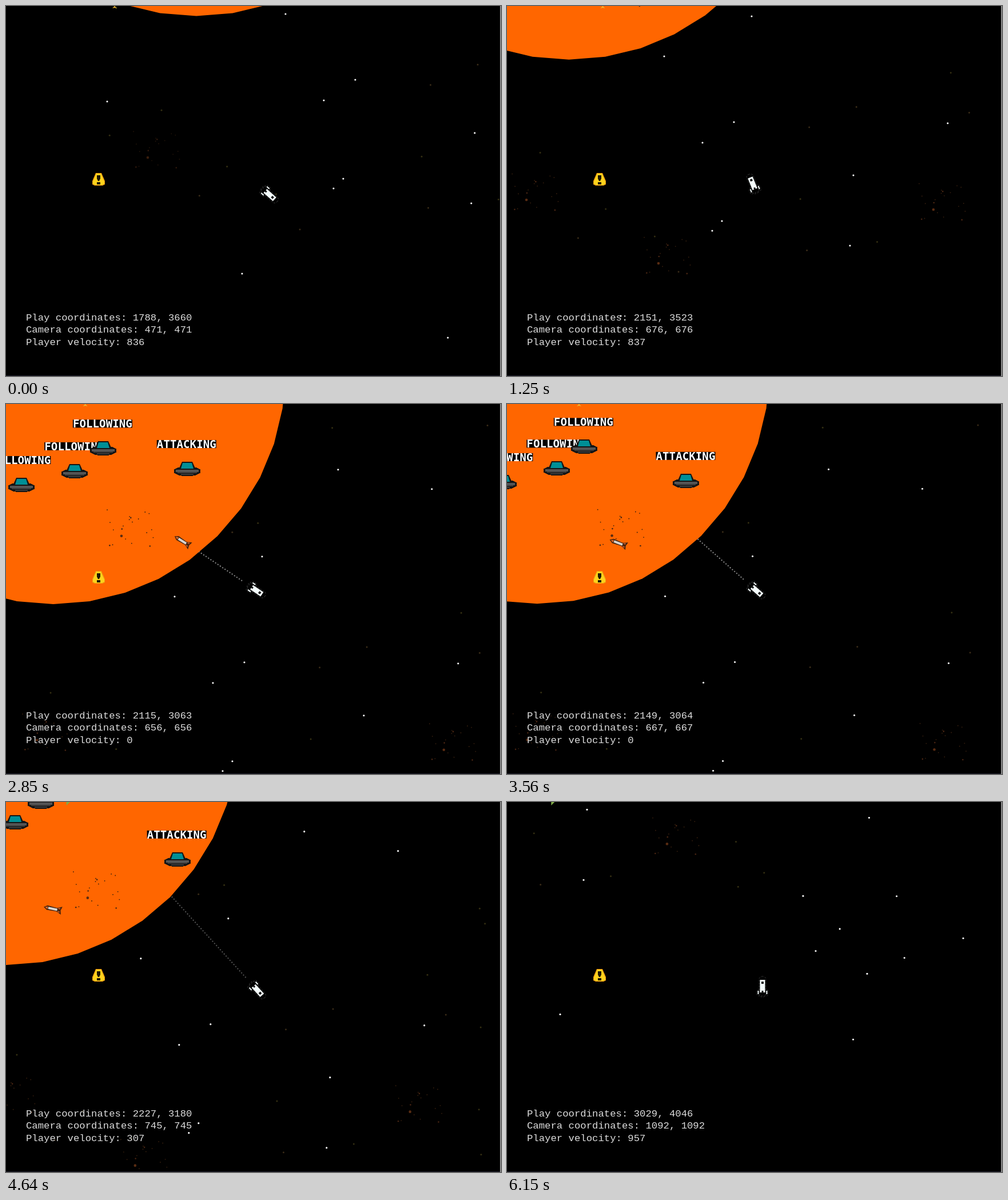
These frames come from a looping animation (866 px wide and 647 px high, 6.23 s). An HTML page with a canvas:

```html
<!DOCTYPE html>
<html lang="en">
<head>
<meta charset="utf-8">
<title>Space flight</title>
<style>
html, body { margin: 0; width: 100%; height: 100%; overflow: hidden; background: #000; }
canvas { display: block; width: 866px; height: 647px; }
</style>
</head>
<body>
<canvas id="stage" width="866" height="647"></canvas>
<script>
const ctx = document.getElementById('stage').getContext('2d');
const LOOP = 6230, TICK = 78;
const REST = { x: 436, y: 326 };   // where the ship sits when the camera has caught up
const SCALE = 1.85;                // world units per star pixel

// Waypoints of the flight
const WAY = {
  time: [0, 1250, 2060, 2850, 4260, 5280, 6150],
  worldX: [1788, 2151, 2081, 2115, 2155, 2607, 3029],
  worldY: [3660, 3523, 3070, 3063, 3074, 3586, 4046],
  camera: [471, 676, 640, 656, 677, 897, 1092],
  starX: [0, -214, -176, -194, -216, -452, -680],
  shipX: [461, 430, 439, 438, 435, 451, 447],
  shipY: [330, 311, 318, 326, 327, 334, 323],
  heading: [42, -112, -4, 34, 48.6, 45, -90],
  speed: [836, 837, 570, 0, 0, 998, 957]
};

const clamp = (v, a = 0, b = 1) => Math.min(b, Math.max(a, v));

// Leg of the flight at time t; progress u advances in even ticks
function legAt(t) {
  let i = 0;
  while (i < WAY.time.length - 2 && t >= WAY.time[i + 1]) i++;
  const span = WAY.time[i + 1] - WAY.time[i];
  const n = Math.round(span / TICK);
  const u = Math.floor(clamp((t - WAY.time[i]) / span) * n + 1e-6) / n;
  return { i, u, span: span / 1000, now: (WAY.time[i] + u * span) / 1000 };
}

const linear = (v, { i, u }) => v[i] + (v[i + 1] - v[i]) * u;

// Hermite curve; the ship's lag behind the camera gives the speed at each waypoint
function glide(v, { i, u, span }, lag, rest, gain) {
  const w = 1 - u;
  const slope = k => (lag[k] - rest) * gain * span;
  return v[i] * w * w * (1 + 2 * u) + v[i + 1] * u * u * (3 - 2 * u)
    + slope(i) * u * w * w - slope(i + 1) * u * u * w;
}

let seed = 11;
function random() {
  seed = (seed * 16807) % 2147483647;
  return seed / 2147483647;
}
const scatter = (n, x, y, w, h) => Array.from({ length: n }, () => [x + random() * w, y + random() * h]);

const STARS = [[489, 14], [611, 129], [556, 165], [177, 167], [820, 222], [590, 302], [573, 319],
  [814, 345], [985, 131], [775, -208], [939, -174], [642, -56], [413, 468], [773, 580],
  [1198, 373], [1310, 509], ...scatter(7, 1220, 210, 300, 580)];
const DIM = scatter(26, 180, -300, 950, 790);
const DUST = scatter(20, -29, -49, 85, 67);
const CLOUDS = [[248, 265], [479, 376], [960, 282], [396, -92]];

function rect(color, ...box) {
  ctx.fillStyle = color;
  ctx.fillRect(...box);
}

function poly(color, ...pts) {
  ctx.fillStyle = color;
  ctx.beginPath();
  pts.forEach(p => ctx.lineTo(...p));
  ctx.closePath();
  ctx.fill();
}

function dot(x, y, size, color) {
  ctx.fillStyle = color;
  ctx.beginPath();
  ctx.arc(x, y, size / 2, 0, 7);
  ctx.fill();
}

function place(x, y, deg, draw) {
  ctx.save();
  ctx.translate(x, y);
  ctx.rotate(deg * Math.PI / 180);
  draw();
  ctx.restore();
}

function planet(x, y) {
  poly('#ff6600', ...Array.from({ length: 40 }, (_, i) => {
    const a = i * Math.PI / 20;
    return [x + 406 * Math.sin(a), y + 405.5 * Math.cos(a)];
  }));
}

function label(word, x, y) {
  const w = word.length * 11.56;
  rect('#000', x - w / 2, y - 7, w, 14);
  ctx.font = 'bold 19.2px "DejaVu Sans Mono", monospace';
  ctx.textAlign = 'center';
  ctx.fillStyle = '#fff';
  ctx.fillText(word, x, y + 7);
  ctx.textAlign = 'left';
}

function ufo(x, y, word) {
  if (y < -20) return;
  label(word, x - 1, y - 44);
  const slab = (color, half, top, h) => rect(color, -half, top, half * 2, h);
  place(Math.round(x), Math.round(y), 0, () => {
    for (let k = 0; k < 4; k++) slab('#151515', 17 + k * 2, k - 3, 13 - k * 2);
    poly('#151515', [-9, -13], [9, -13], [14, -2], [-14, -2]);
    poly('#008f96', [-8, -11], [8, -11], [11, -1], [-11, -1]);
    slab('#151515', 15, 8, 3);
    slab('#151515', 10, 10, 2);
    slab('#555', 20, 1, 4);
    slab('#3b3b3b', 17, 5, 2);
    slab('#3b3b3b', 11, 8, 2);
  });
}

function ship(x, y, deg) {
  place(x, y, deg + 90, () => {
    ctx.strokeStyle = '#303030';
    ctx.setLineDash([3, 2]);
    ctx.beginPath();
    ctx.roundRect(-6, -18, 12, 36, 5);
    ctx.roundRect(-10, 5, 20, 11, 3);
    ctx.stroke();
    rect('#f4fcfc', -4.5, -12, 9, 22);
    for (const side of [-7.5, 7.5]) rect('#f4fcfc', side - 1, 7, 2, 6);
    rect('#101010', -2, -9, 4, 4);
    rect('#101010', -1.5, 7, 3, 4);
  });
}

// Fired from the ship, slowing down as it levels out
function missile(now, sx, sy) {
  const age = now - 2.35;
  if (age < 0) return;
  const fade = Math.exp(-0.767 * age);
  const y = sy - 86 + 86 * Math.exp(-10 * age) + 6 * age;
  place(sx + 275 + 335 * fade, y, 5 + 40 * fade, () => {
    poly('#40200c', [-17, 0], [-11, -4], [6, -3], [15, -7], [13, 0], [15, 7], [6, 3], [-11, 4]);
    poly('#d86a30', [-15, 0], [-10, -2.5], [-10, 2.5]);
    rect('#d8d2cc', -9, -2, 16, 4);
    for (const side of [-3, 3]) rect('#a84c20', 8, side - 1.5, 4, 3);
  });
}

function aimLine(x, y, deg, alpha) {
  ctx.globalAlpha = alpha;
  place(x, y, deg, () => {
    for (let d = 31; d < 300; d += 5) rect('#fff', -d - 1, -1, 2, 2);
  });
  ctx.globalAlpha = 1;
}

function clouds(now, sx, sy) {
  CLOUDS.forEach(([x, y], k) => {
    ctx.globalAlpha = k === 1 ? clamp(now) : clamp(0.65 + now / 2);
    DUST.forEach(([dx, dy], i) => dot(x + sx + dx, y + sy + dy, i % 5 ? 1.8 : 2.6, i % 5 ? '#38200f' : '#4a2613'));
    dot(x + sx, y + sy, 4.6, '#592c12');
  });
  ctx.globalAlpha = 1;
}

function bell() {
  place(162, 303, 0, () => {
    poly('#f09a10', [-5, -11], [5, -11], [11, 3], [11, 9], [7, 11], [-7, 11], [-11, 9], [-11, 3]);
    poly('#ffd21c', [-4, -10], [4, -10], [10, 4], [10, 8], [6, 10], [-6, 10], [-10, 8], [-10, 4]);
    poly('#1c1604', [-3, -7], [3, -7], [3, -1], [1, 3], [-1, 3], [-3, -1]);
    rect('#1c1604', -3, 5, 6, 4);
  });
}

function marker(now) {
  const x = 190 - 18 * now;
  if (now < 4.5) poly('#f0b830', [x - 4, 4], [x, 0], [x + 4, 4], [x, 3]);
  else poly('#80ac48', [x - 2, 0], [x + 4, 0], [x - 2, 6]);
}

function hud(...lines) {
  ctx.font = '17.3px "Liberation Mono", "Courier New", monospace';
  ctx.fillStyle = '#dcdcdc';
  lines.forEach((line, i) => ctx.fillText(line, 35, 549.5 + i * 21.5));
}

function draw(t) {
  const leg = legAt(t), now = leg.now;
  const at = name => linear(WAY[name], leg);
  const alongX = (v, gain) => glide(v, leg, WAY.shipX, REST.x, gain);
  const worldX = alongX(WAY.worldX, 14 * SCALE);
  const worldY = glide(WAY.worldY, leg, WAY.shipY, REST.y, 14 * SCALE);
  const sx = alongX(WAY.starX, -14);
  const sy = (WAY.worldY[0] - worldY) / SCALE;
  const x = at('shipX'), y = at('shipY'), heading = at('heading'), speed = at('speed');

  // The planet is a little nearer than the stars and drifts left
  const drift = 88 * (1 - Math.exp(-Math.max(0, now - 1.15) / 2));
  const px = 333 + 1.03 * sx - drift, py = -388 + 1.03 * sy;

  rect('#000', 0, 0, 866, 647);
  DIM.forEach(([a, b], i) => dot(a + sx, b + sy, 3, i % 3 ? '#342f12' : '#3a2c18'));
  for (const [a, b] of STARS) dot(a + sx, b + sy, 3.1, '#fff');
  aimLine(x, y, heading, 0.55 * clamp(1 - speed / 780));
  planet(px, py);
  clouds(now, sx, sy);

  const since = now - 2.06;
  const sway = 12 * Math.sin(since * Math.PI / 2.2);
  const follow = (dx, dy, vx, vy) =>
    ufo(px + dx + vx * since + sway, py + dy + vy * since + sway / 2, 'FOLLOWING');
  follow(-64, 197, -3, -6);
  follow(29, 172, -3, -5);
  follow(74, 62, -5, -34);
  follow(81, 131, -6, -3);
  ufo(px + 204 + 38 * since, py + 146 + 30 * since, now < 2.4 ? 'READY' : 'ATTACKING');

  missile(now, sx, sy);
  ship(x, y, heading);
  marker(now);
  bell();
  const cam = Math.round(at('camera'));
  hud(`Play coordinates: ${Math.round(worldX)}, ${Math.round(worldY)}`,
    `Camera coordinates: ${cam}, ${cam}`,
    `Player velocity: ${Math.round(speed)}`);
  rect('#1c1c2c', 0, 646, 866, 1);
  rect('#a8a8a8', 864.5, 0, 1.5, 647);
}

let start = null;
function loop(stamp) {
  if (start === null) start = stamp;
  draw((stamp - start) % LOOP);
  requestAnimationFrame(loop);
}
draw(0);
requestAnimationFrame(loop);
</script>
</body>
</html>
```
